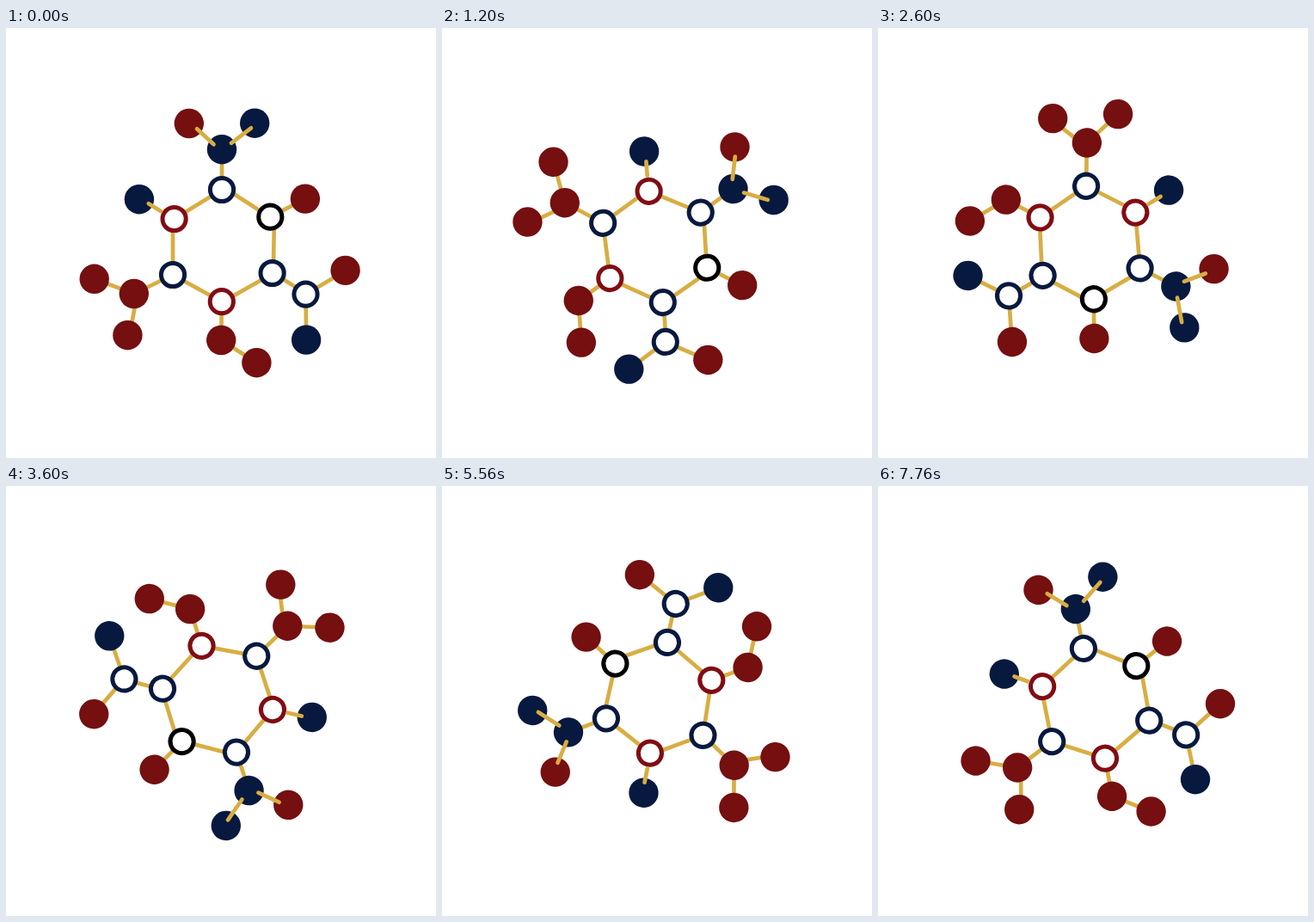
An HTML page for the animation above (7.8 s loop, 500 by 500 pixels).

```html
<!DOCTYPE html>
<html lang="en">
<head>
<meta charset="utf-8">
<title>Rotating molecule</title>
<style>
  html, body { margin: 0; width: 100%; height: 100%; overflow: hidden; background: #fff; }
  svg { display: block; width: 100%; height: 100%; }
  .bond { stroke: #d8ad43; stroke-width: 4.7; stroke-linecap: round; fill: none; }
</style>
</head>
<body>
<svg viewBox="0 0 500 500"><g id="molecule"></g></svg>
<script>
const LOOP = 7800, STEP = 40, DEGREES_PER_STEP = 1.798;
const RED = '#750f10', RING_RED = '#800d14', BLUE = '#08193f', BLACK = '#000';
const molecule = document.getElementById('molecule');

function add(name, attributes) {
  const node = document.createElementNS('http://www.w3.org/2000/svg', name);
  for (const key in attributes) node.setAttribute(key, attributes[key]);
  molecule.append(node);
}

const bond = path => add('path', { class: 'bond', d: path });
const disc = (cx, cy, fill) => add('circle', { cx, cy, r: 17.2, fill });
const ring = (cx, cy, stroke) =>
  add('circle', { cx, cy, r: 13.6, fill: '#fff', stroke, 'stroke-width': 5 });

// Bonds behind the atoms: the hexagon, then the branches
bond('M258 188.5L303 217.4');
bond('M311.8 230L311 275');
bond('M309.9 285.7L251.2 318.9');
bond('M250.8 318.2L194 287V230');
bond('M195.6 222L251 188V141');
bond('M307.3 219.7L348 198.7');
bond('M309.9 284.3L348.9 309');
bond('M394.6 282.2L348.5 309.7L349.2 362.6');
bond('M250.8 318.2L250.3 363L291.4 389.2');
bond('M194 287L148.9 309L102.8 291.8M152 313L144.6 352');

disc(251, 141.2, BLUE);
disc(212.8, 111, RED);
disc(289.2, 110.7, BLUE);
disc(154.9, 199.2, BLUE);
disc(347.9, 198.6, RED);
disc(394.6, 281.9, RED);
disc(349.1, 362.6, BLUE);
disc(250.2, 363, RED);
disc(291.4, 389.2, RED);
disc(148.8, 309, RED);
disc(102.7, 291.8, RED);
disc(141.4, 357.2, RED);

ring(251, 188, BLUE);
ring(307.3, 219.7, BLACK);
ring(309.6, 285, BLUE);
ring(250.8, 318.2, RING_RED);
ring(194, 287, BLUE);
ring(195.6, 222, RING_RED);
ring(348.5, 309.6, BLUE);

// Bonds in front of the atoms
bond('M222 117.3L241.5 135.3');
bond('M262 133.8L285 116.3');
bond('M165.8 204.3L180 213');

function draw(time) {
  const step = Math.floor((time % LOOP) / STEP);
  molecule.setAttribute('transform', `rotate(${step * DEGREES_PER_STEP} 249.75 250.15)`);
}

let start;
function tick(now) {
  start ??= now;
  draw(Math.max(0, now - start));
  requestAnimationFrame(tick);
}
draw(0);
requestAnimationFrame(tick);
</script>
</body>
</html>
```
